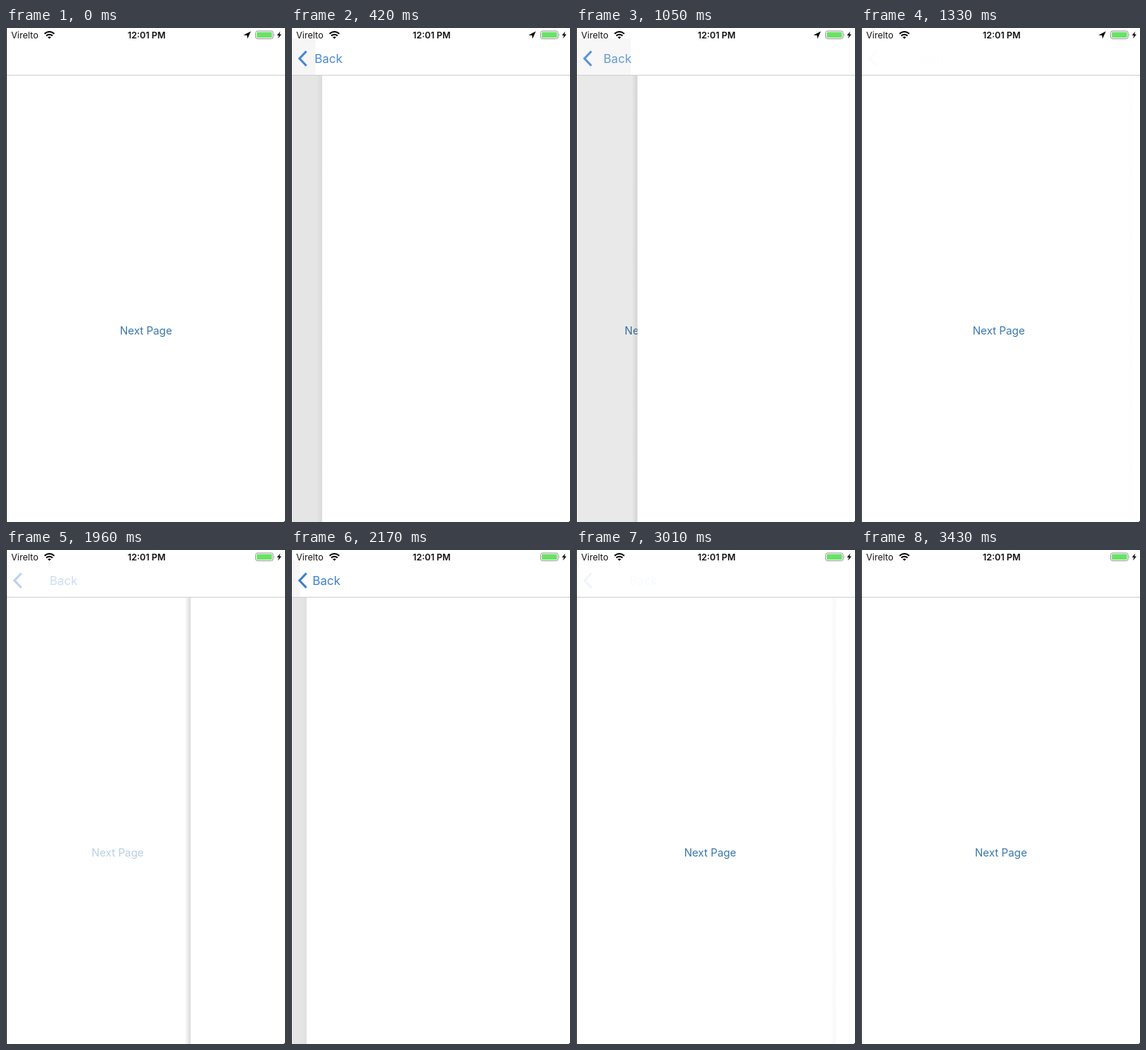
An HTML page for the animation above (3.5 s loop, 376x664 px).

```html
<!DOCTYPE html>
<html lang="en">
<head>
<meta charset="utf-8">
<title>Page push and pop</title>
<style>
  html, body { margin: 0; width: 100%; height: 100%; overflow: hidden; background: #fff; }
  svg { display: block; width: 376px; height: 664px; }
  text { font-family: Inter, "Liberation Sans", sans-serif; }
  .status { font-size: 12px; fill: #111; }
  .link { font-size: 14.4px; fill: #3a77ac; }
  .back { font-size: 16.2px; fill: #2f78cb; }
</style>
</head>
<body>
<svg viewBox="0 0 376 664">
  <defs>
    <linearGradient id="fade">
      <stop offset="0" stop-color="#000" stop-opacity="0"/>
      <stop offset="1" stop-color="#000" stop-opacity=".22"/>
    </linearGradient>
  </defs>
  <rect width="376" height="664" fill="#fff"/>

  <!-- first page -->
  <text id="next" class="link" x="153.5" y="411.5">Next Page</text>
  <rect id="dim" x="1" y="64" width="375" height="600"/>

  <!-- second page -->
  <g id="page">
    <rect id="shadow" x="-8" y="64" width="8" height="600" fill="url(#fade)"/>
    <rect y="64" width="376" height="600" fill="#fff"/>
  </g>

  <!-- navigation bar -->
  <rect width="376" height="64" fill="#fff"/>
  <rect id="tint" x="1" y="14" height="49" fill="#f6f6f6"/>
  <rect y="63" width="376" height="1" fill="#d0d0d0"/>
  <path id="chevron" d="M20.7 31.3L11.4 41L20.7 50.7" fill="none" stroke="#2f78cb" stroke-width="2.9"/>
  <text id="back" class="back" x="26.3" y="47">Back</text>

  <!-- status bar -->
  <text class="status" x="7" y="13.7">Virelto</text>
  <g fill="none" stroke="#000" stroke-width="2">
    <path d="M51.9 7.7Q58.5 2.3 65.1 7.7"/>
    <path d="M54.3 10.4Q58.5 7 62.7 10.4"/>
  </g>
  <path d="M58.5 14.6L56.2 12.2Q58.5 10.6 60.8 12.2Z"/>
  <text class="status" x="189.5" y="13.7" font-weight="600" text-anchor="middle">12:01 PM</text>
  <path id="arrow" d="M330 4.6L320 9.5L325 9.9L325.4 14.6Z"/>
  <rect x="336.5" y="4" width="23.5" height="10.5" rx="2.5" fill="#fff" stroke="#999"/>
  <rect x="338" y="5.5" width="20.5" height="7.5" rx="1" fill="#6be168"/>
  <path d="M361 7.5Q362.6 9.2 361 11Z" fill="#999"/>
  <path d="M369.6 4.6L365.2 10H367.8L366.6 14.2L371.2 8.6H368.5Z"/>

  <!-- window edge -->
  <rect width="1" height="664" fill="#111"/>
  <path d="M376 662.2V664H374.2Z" fill="#333"/>
</svg>
<script>
  const LOOP = 3500, STEP = 70, WIDTH = 375, OMEGA = 0.0165;
  const $ = id => document.getElementById(id);
  const [next, dim, page, shadow, tint, chevron, back, arrow] =
    ["next", "dim", "page", "shadow", "tint", "chevron", "back", "arrow"].map($);
  const clamp = v => Math.min(1, Math.max(0, v));
  const shift = (el, x) => el.setAttribute("transform", `translate(${x.toFixed(2)} 0)`);
  const alpha = (el, a) => el.setAttribute("opacity", a.toFixed(3));

  // critically damped spring, 0 to 1
  function spring(ms) {
    const x = OMEGA * Math.max(0, ms);
    return x > 8 ? 1 : 1 - (1 + x) * Math.exp(-x);
  }

  const cover = t =>
    spring(t - 191) - spring(t - 997) + spring(t - 1887) - spring(t - 2747);

  function draw(t) {
    const p = clamp(cover(t));
    const edge = 1 + WIDTH * (1 - p);
    const shade = clamp((p - 0.35) / 0.5);
    const pressed = (t >= 140 && t < 980) || (t >= 1820 && t < 2730);

    shift(next, -0.3 * WIDTH * p);
    alpha(next, pressed ? 0.35 : 1);
    alpha(dim, 0.1 * shade);
    shift(page, edge);
    alpha(shadow, 2 * Math.min(p, 1 - p));
    tint.setAttribute("width", Math.max(0, edge - 10));
    alpha(tint, shade);
    alpha(chevron, p);
    shift(back, 49 * (1 - p));
    alpha(back, p ** 1.3);
    alpha(arrow, t < 1540 ? 1 : 0);
  }

  const start = performance.now();
  function tick() {
    const t = (performance.now() - start) % LOOP;
    draw(Math.floor(t / STEP) * STEP);
    requestAnimationFrame(tick);
  }
  draw(0);
  requestAnimationFrame(tick);
</script>
</body>
</html>
```
